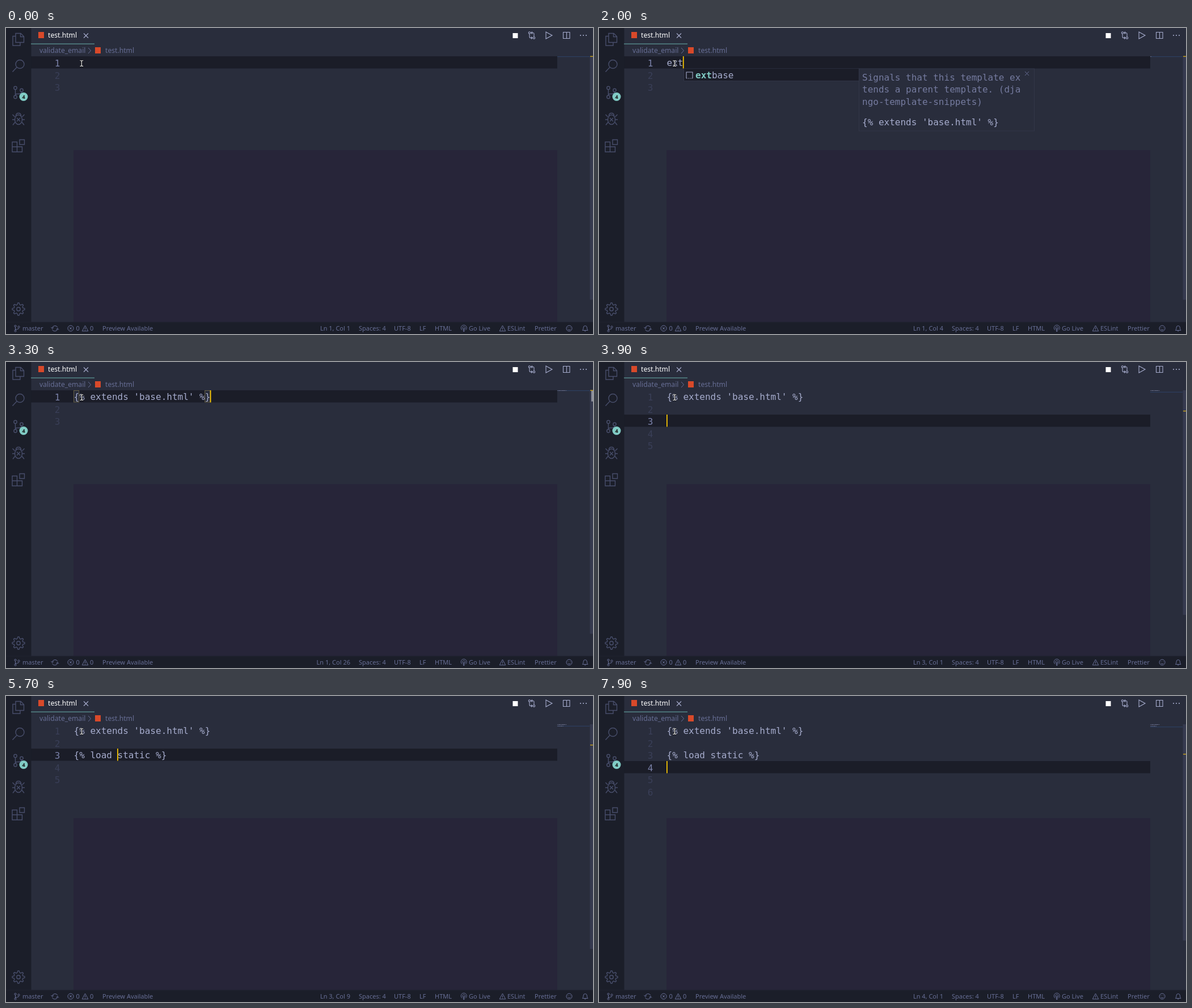
Recreate the animation shown at these times as an HTML page. Size 1035x541 px, loop 8000 ms.

```html
<!DOCTYPE html>
<html lang="en">
<head>
<meta charset="utf-8">
<title>Snippet typing</title>
<style>
html, body { margin: 0; width: 100%; height: 100%; overflow: hidden; background: #292d3c; }
svg { display: block; position: absolute; left: 0; top: 0; }
text { white-space: pre; }
.mono { font: 16px "DejaVu Sans Mono", monospace; fill: #a6accd; }
.mono .hit { font-weight: bold; fill: #80cbc4; }
.mono.dim { fill: #757b9f; }
.num { font: 16px "DejaVu Sans Mono", monospace; fill: #3a3f58; text-anchor: end; }
.num.on { fill: #7b82aa; }
.ui { font: 12.15px "Noto Sans", "Open Sans", sans-serif; fill: #676e95; }
.bar { font: 11px "Noto Sans", "Open Sans", sans-serif; fill: #676e95; }
.line { fill: none; stroke-width: 1.4; stroke: #484e6b; }
.thin { fill: none; stroke-width: 1; stroke: #676e95; }
.tool { fill: none; stroke-width: 1.1; stroke: #a6accd; }
</style>
</head>
<body>
<svg width="1035" height="541" viewBox="0 0 1035 541">
  <rect width="1035" height="541" fill="#292d3c"/>
  <rect x="119" y="216" width="853" height="305" fill="#272539"/>
  <g id="editor"></g>
  <rect width="44.5" height="541" fill="#1b1e29"/>
  <rect y="520" width="1035" height="21" fill="#1b1e29"/>
  <rect y="519.5" width="1035" height="1" fill="#202330"/>

  <!-- activity bar -->
  <g class="line">
    <path d="M17 9.5h9l5.500 5.500v10.500H17zM25.500 9.500v6h6M17 14.500h-5v16.500h13v-5.500"/>
    <circle cx="24.500" cy="64" r="7.500"/><path d="M19 69.500l-7.500 8"/>
    <circle cx="16.500" cy="106" r="2.700"/><circle cx="16.500" cy="122" r="2.700"/><circle cx="27.500" cy="110" r="2.700"/>
    <path d="M16.500 109v10M27.500 113q0 3.500-5 3.500h-3q-3 0-3 2.500"/>
    <ellipse cx="22" cy="162" rx="6.500" ry="8.500"/>
    <path d="M17.500 155.500q0-5 4.500-5t4.500 5M15.500 157l-4-4M28.500 157l4-4M15.500 162H11M28.500 162H33M16 166.500l-4 5M28 166.500l4 5M19 159l6 6M25 159l-6 6"/>
    <path d="M11 201.500h8.500v17.500H11zM11 210h17.500v9H11zM24 197.500h8.500v8.500H24z"/>
    <circle cx="22" cy="497" r="3.200"/>
    <path id="gear"/>
  </g>
  <circle cx="31" cy="121.500" r="7.500" fill="#80cbc4"/>
  <text x="31" y="125" text-anchor="middle" font-family="Noto Sans, sans-serif" font-size="9" font-weight="bold" fill="#111">4</text>

  <!-- tab and breadcrumbs -->
  <rect x="44" y="27.500" width="112" height="1.200" fill="#5f9c99"/>
  <rect x="57" y="7" width="10" height="11" fill="#d8492a"/>
  <text class="ui" x="74" y="17" style="fill:#fff">test.html</text>
  <path class="tool" d="M137 9.500l8 8M145 9.500l-8 8"/>
  <text class="ui" x="59" y="44">validate_email</text>
  <path class="thin" d="M145 35l4.500 5-4.500 5"/>
  <rect x="157" y="34" width="10" height="11" fill="#d8492a"/>
  <text class="ui" x="175" y="44">test.html</text>
  <rect x="893.500" y="9" width="9" height="9" fill="#fff"/>
  <g class="tool">
    <circle cx="923" cy="8.500" r="1.700"/><circle cx="931" cy="17.500" r="1.700"/>
    <path d="M923 10.500v5q0 2 2 2h3M926 15.500l2 2-2 2M931 15.500v-5q0-2-2-2h-3M928 6.500l-2 2 2 2M952 7l11 6-11 6zM982.500 7.500h11.500v11h-11.500zM988.500 7.500v11"/>
  </g>
  <g fill="#a6accd"><circle cx="1013" cy="13" r="1.100"/><circle cx="1018" cy="13" r="1.100"/><circle cx="1023" cy="13" r="1.100"/></g>

  <!-- status bar -->
  <g class="thin">
    <circle cx="16.500" cy="527" r="1.600"/><circle cx="16.500" cy="535.500" r="1.600"/><circle cx="22.500" cy="528.500" r="1.600"/>
    <path d="M16.500 529v5M22.500 530.500q0 2-3 2t-3 2"/>
    <path d="M81.500 530.500a5 5 0 0 1 9.500-1M91 532a5 5 0 0 1-9.500 1M79.500 529l2 2.500 2.500-2M93 533.500l-2-2.500-2.500 2"/>
    <circle cx="114" cy="531" r="5"/><path d="M112 529l4 4M116 529l-4 4"/>
    <path id="warn" d="M139.500 526l5.300 9.800h-10.600zM139.500 529.500v3.200M139.500 533.700v1"/>
    <use href="#warn" x="736"/>
    <path d="M804 534a5 5 0 1 1 6.500 0M805.300 532a2.500 2.500 0 1 1 4 0M806.300 531.500h2l-.3 5h-1.400z"/>
    <circle cx="993" cy="531" r="5"/><path d="M990.500 532.500q2.500 3 5 0M991 529v1M995 529v1"/>
    <path d="M1016.500 534.500q1.500-1.500 1.500-4.500a3.200 3.500 0 0 1 6.400 0q0 3 1.500 4.500zM1020 535.500q1.200 1.500 2.400 0"/>
  </g>
  <g id="labels"></g>
  <text class="bar" id="position" x="607" y="535" text-anchor="end"></text>

  <g id="popup"></g>
  <path d="M130.500 57.500q2.800 0 2.800 1.200 0-1.200 2.800-1.200M133.300 58.500v8M130.500 67.500q2.800 0 2.800-1.200 0 1.200 2.800 1.200" fill="none" stroke="#111" stroke-width="2.600"/>
  <path d="M130.500 57.500q2.800 0 2.800 1.200 0-1.200 2.800-1.200M133.300 58.500v8M130.500 67.500q2.800 0 2.800-1.200 0 1.200 2.800 1.200" fill="none" stroke="#fff" stroke-width="1.100"/>
</svg>
<script>
const LOOP = 8000, TOP = 50, ROW = 21.55, LEFT = 119.5, CHAR = 9.632, VIEW = 470;
const EXTENDS = "{% extends 'base.html' %}", LOAD = '{% load static %}';
const byId = id => document.getElementById(id);
const rowTop = line => TOP + Math.round((line - 1) * ROW);
const colX = col => LEFT + (col - 1) * CHAR;

const rect = (x, y, w, h, fill, extra = '') =>
  `<rect x="${x}" y="${y}" width="${w}" height="${h}" fill="${fill}" ${extra}/>`;
const label = (x, y, cls, content) => `<text x="${x}" y="${y}" class="${cls}">${content}</text>`;

const extPopup = {
  x: 149, line: 2, typed: 3, items: ['extbase'], code: EXTENDS,
  docs: ['Signals that this template ex', 'tends a parent template. (dja', 'ngo-template-snippets)']
};
const ldPopup = {
  x: 129, line: 4, typed: 2, items: ['ld'], code: LOAD,
  docs: ['Loads a custom template tag s', 'et. (django-template-snippet', 's)']
};
const links = ['atom', 'css', 'favicon', 'im', 'import', 'manifest', 'mf', 'print', 'rss', 'touch'];
const lPopup = { ...ldPopup, typed: 1, items: [...links.map(n => 'link:' + n), 'lorem', 'ld'] };

// Each entry changes part of the editor state at the given time.
const beats = [
  [0, { lines: ['', '', ''], ln: 1, col: 1, caret: 0, selected: 0, match: 0, mark: 0, ruler: 1, popup: null }],
  [500, { caret: 1 }],
  [1100, { caret: 0 }],
  [1400, { caret: 1 }],
  [1600, { lines: ['e', '', ''], col: 2 }],
  [1900, { lines: ['ex', '', ''], col: 3 }],
  [2000, { lines: ['ext', '', ''], col: 4, popup: extPopup }],
  [2600, { lines: [EXTENDS, '', ''], col: 22, selected: 9, popup: null }],
  [3000, { caret: 0 }],
  [3300, { col: 26, caret: 1, selected: 0, match: 1, mark: 1 }],
  [3700, { lines: [EXTENDS, '', '', ''], ln: 2, col: 1 }],
  [3800, { lines: [EXTENDS, '', '', '', ''], ln: 3 }],
  [3900, { match: 0, mark: 0, ruler: 3 }],
  [4500, { caret: 0 }],
  [4800, { lines: [EXTENDS, '', 'l', '', ''], col: 2, caret: 1 }],
  [4900, { popup: lPopup }],
  [5100, { lines: [EXTENDS, '', 'ld', '', ''], col: 3, popup: ldPopup }],
  [5500, { caret: 0 }],
  [5700, { lines: [EXTENDS, '', LOAD, '', ''], col: 9, caret: 1, popup: null }],
  [5900, { match: 3 }],
  [6200, { caret: 0 }],
  [6700, { col: 15, caret: 1 }],
  [7200, { col: 18, mark: 3 }],
  [7600, { lines: [EXTENDS, '', LOAD, '', '', ''], ln: 4, col: 1 }],
  [7900, { match: 0, mark: 0, ruler: 4 }]
];
const states = [];
beats.forEach(([, change], i) => states.push({ ...states[i - 1], ...change }));

function minimap(s) {
  let out = rect(972, TOP + (s.ln - 1) * 1.35, 57, 1.2, '#2d3f60');
  s.lines.forEach((line, i) => {
    for (const word of line.matchAll(/\S+/g))
      out += rect(972 + word.index * .65, TOP + i * 1.35, word[0].length * .65, 1, '#666c88');
  });
  return out;
}

function overview(s) {
  const scale = VIEW / (VIEW + (s.lines.length - 1) * ROW);
  const y = line => TOP + (line - 1) * ROW * scale;
  return rect(1029.5, TOP, 5.5, VIEW * scale, '#363a4f') +
    (s.mark ? rect(1032, y(s.mark), 3, ROW * scale, '#8d8f9c') : '') +
    rect(1030, y(s.ruler) - .5, 5, 1.5, '#c09c1c');
}

function editor(s) {
  const y = rowTop(s.ln);
  let out = rect(44, y, s.selected ? 75 : 928, 21.5, '#1b1d28');
  if (s.selected)
    out += rect(colX(s.col - s.selected), y, s.selected * CHAR, 21.5, '#40466a');
  if (s.match)
    for (const col of [1, s.lines[s.match - 1].length])
      out += rect(colX(col), rowTop(s.match) + .5, CHAR - .5, 20.5, '#292d3c', 'stroke="#665f45"');
  s.lines.forEach((line, i) => {
    out += label(95.3, rowTop(i + 1) + 18, i + 1 === s.ln ? 'num on' : 'num', i + 1);
    out += label(LEFT, rowTop(i + 1) + 17, 'mono', line);
  });
  if (s.caret) out += rect(colX(s.col) - .5, y, 1.7, 21.5, '#ffcc00');
  return out + minimap(s) + overview(s);
}

function icon(x, y, snippet) {
  return snippet
    ? `<path class="tool" d="M${x} ${y + 11}v-11h11v11"/><path class="tool" stroke-dasharray="1.500 1.500" d="M${x} ${y + 11}h11"/>`
    : `<path class="tool" d="M${x} ${y + 9.5}l5.500-5.500q-.5-4 4-4.500l-2 2.500 2 2 2.500-2q0 4.500-4.500 4.300l-5.500 5.500q-2.500 0-2-2.300z"/>`;
}

function popup(p) {
  if (!p) return '';
  const top = TOP + (p.line - 1) * ROW + .5, count = p.items.length, long = count > 1;
  const frame = (x, h) => rect(x + .5, top, 309, h, '#292d3c', 'stroke="#323648"');
  const selectedTop = top + (count - 1) * ROW;
  let out = frame(p.x, count * ROW) + rect(p.x + 1, selectedTop, long ? 298 : 308, ROW - .5, '#1b1d28');
  if (long) out += rect(p.x + 299, 193, 9.5, 160.5, '#3a3e52');
  p.items.forEach((item, i) => {
    const y = top + i * ROW, snippet = i === count - 1;
    out += icon(p.x + 5, y + 6, snippet);
    out += label(p.x + 21, Math.round(y + 16.5), 'mono',
      `<tspan class="hit">${item.slice(0, p.typed)}</tspan>${item.slice(p.typed)}`);
  });
  const x = p.x + 309;
  out += frame(x, 110);
  p.docs.forEach((line, i) => { out += label(x + 6, Math.round(top + 20.5 + i * 21.6), 'mono dim', line); });
  out += label(x + 6, Math.round(top + 100), 'mono', p.code);
  return out + `<path class="thin" d="M${x + 293} ${top + 5}l7 7m0-7l-7 7"/>`;
}

byId('labels').innerHTML = [
  [29, 'master'], [123.5, '0'], [148, '0'], [170, 'Preview Available'], [622, 'Spaces: 4'], [684, 'UTF-8'],
  [729, 'LF'], [756, 'HTML'], [816, 'Go Live'], [884, 'ESLint'], [932, 'Prettier']
].map(([x, content]) => label(x, 535, 'bar', content)).join('');

byId('gear').setAttribute('d', 'M' + Array.from({ length: 32 }, (_, i) => {
  const angle = (i - .5) * Math.PI / 16, r = i % 4 < 2 ? 11 : 8;
  return `${(22 + r * Math.cos(angle)).toFixed(2)} ${(497 + r * Math.sin(angle)).toFixed(2)}`;
}).join('L') + 'Z');

let shown = -1;
const start = performance.now();
function draw() {
  const t = (performance.now() - start) % LOOP;
  const current = beats.findLastIndex(([at]) => at <= t);
  if (current !== shown) {
    shown = current;
    const s = states[current];
    byId('editor').innerHTML = editor(s);
    byId('popup').innerHTML = popup(s.popup);
    byId('position').textContent = `Ln ${s.ln}, Col ${s.col}` + (s.selected ? ` (${s.selected} selected)` : '');
  }
  requestAnimationFrame(draw);
}
draw();
</script>
</body>
</html>
```
